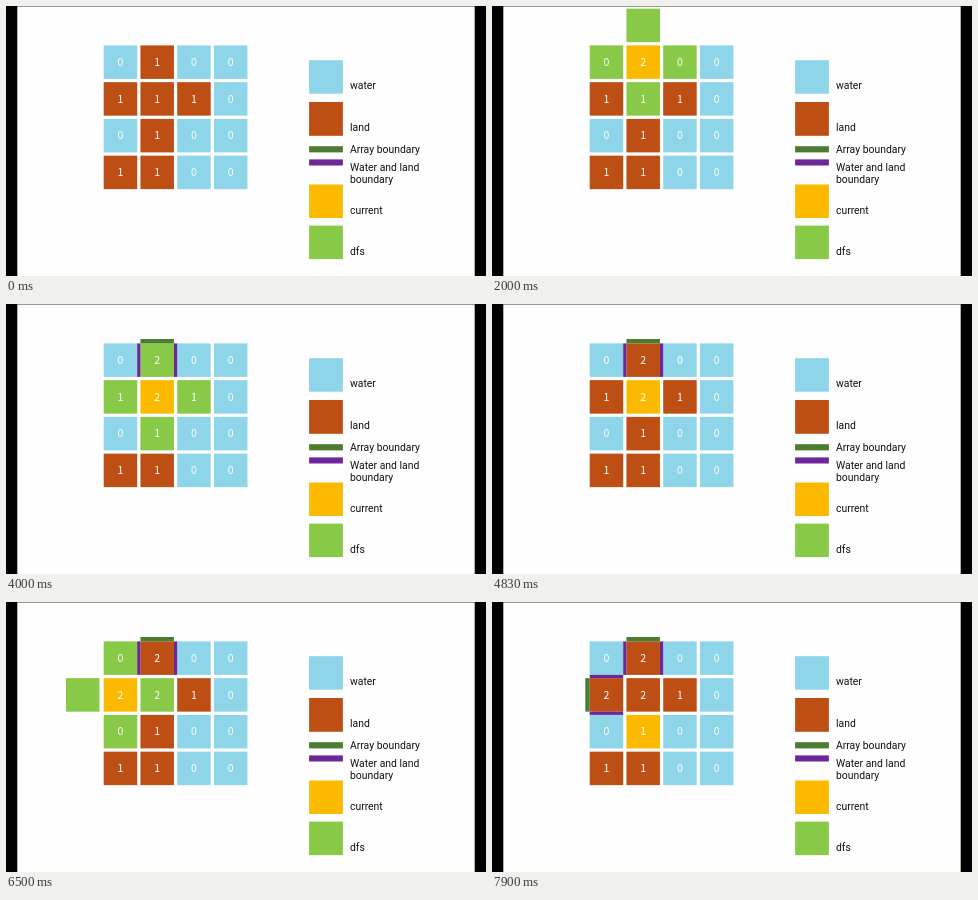
Write an HTML page that moves like this. It is 480 by 270 pixels and loops after 8 s.

```html
<!DOCTYPE html>
<html lang="en">
<head>
<meta charset="utf-8">
<title>Island perimeter</title>
<style>
  html, body { margin: 0; width: 100%; height: 100%; overflow: hidden; background: #000; }
  svg { display: block; width: 100vw; height: 100vh; }
  text { font-family: Roboto, "Open Sans", sans-serif; font-size: 10.4px; }
  .digit { fill: #fff; font-family: "Noto Sans CJK SC", "Noto Sans", sans-serif; font-size: 10.6px; text-anchor: middle; }
</style>
</head>
<body>
<svg id="stage" viewBox="0 0 480 270"></svg>
<script>
const LOOP = 8000, PITCH = 36.75, SIZE = 33.5, LEFT = 97.7, TOP = 39.4;
const COLOR = {
  water: '#8fd5e9', land: '#bd4f14', edge: '#4b7c2f',
  shore: '#6d2798', current: '#fbba00', dfs: '#88c948'
};
const grid = ['0100', '1110', '0100', '1100'];
const around = [[-1, 0], [1, 0], [0, -1], [0, 1]];
const stage = document.getElementById('stage');

function add(tag, attrs, content = '') {
  const node = document.createElementNS('http://www.w3.org/2000/svg', tag);
  for (const key in attrs) node.setAttribute(key, attrs[key]);
  node.textContent = content;
  return stage.appendChild(node);
}
const box = (x, y, width, height, fill) => add('rect', { x, y, width, height, fill });
const xOf = col => LEFT + col * PITCH;
const yOf = row => TOP + row * PITCH;
const keyOf = (row, col) => row + ',' + col;

box(11.3, 0.4, 457.4, 269.6, '#fefefe');

const legend = [
  ['water', 54.2, SIZE], ['land', 96, 33.8], ['edge', 140.2, 6.2],
  ['shore', 153.4, 6.1], ['current', 178.5, SIZE], ['dfs', 219.6, SIZE]
];
for (const [kind, y, height] of legend) box(303.1, y, 33.8, height, COLOR[kind]);

const labels = [
  ['water', 83.3], ['land', 125.2], ['Array boundary', 147.2],
  ['Water and land', 164.8], ['boundary', 177.4], ['current', 207.6], ['dfs', 248.7]
];
for (const [label, y] of labels) add('text', { x: 344, y, fill: '#111' }, label);

const cells = {};
function addCell(row, col, value, x = xOf(col)) {
  const rect = box(x, yOf(row), SIZE, SIZE, COLOR.dfs);
  const digit = add('text', {
    class: 'digit', x: x + SIZE / 2, y: yOf(row) + 20.5
  }, value);
  cells[keyOf(row, col)] = { rect, digit, value };
}
grid.forEach((line, row) => [...line].forEach((value, col) => addCell(row, col, value)));
addCell(-1, 1, '');
addCell(1, -1, '', 60);

// Each visit: current cell, then marked, neighbours searched, borders drawn.
const visits = [
  { row: 0, col: 1, start: 950, mark: 1350, search: 1750, settle: 2570 },
  { row: 1, col: 1, start: 3150, mark: 3480, search: 3900, settle: 4650 },
  { row: 1, col: 0, start: 5320, mark: 5720, search: 6150, settle: 6980 },
  { row: 2, col: 1, start: 7570, mark: Infinity, search: Infinity, settle: Infinity }
];

function addBorder(row, col, [dr, dc]) {
  const near = cells[keyOf(row + dr, col + dc)];
  if (near.value === '1') return [];
  const thick = near.value === '' ? 4.4 : PITCH - SIZE;
  const offset = d => d < 0 ? -thick : d > 0 ? SIZE : 0;
  return [box(xOf(col) + offset(dc), yOf(row) + offset(dr),
    dc ? thick : SIZE, dr ? thick : SIZE,
    near.value === '' ? COLOR.edge : COLOR.shore)];
}
for (const visit of visits) {
  visit.borders = visit.settle < LOOP
    ? around.flatMap(step => addBorder(visit.row, visit.col, step)) : [];
}

function draw(time) {
  const active = visits.filter(visit => time >= visit.start).pop();
  const searching = active && time >= active.search && time < active.settle;
  const found = new Set(searching
    ? around.map(([dr, dc]) => keyOf(active.row + dr, active.col + dc)) : []);
  const current = active && keyOf(active.row, active.col);
  const marked = new Set(visits.filter(v => time >= v.mark).map(v => keyOf(v.row, v.col)));

  for (const key in cells) {
    const { rect, digit, value } = cells[key];
    const kind = key === current ? 'current' : found.has(key) ? 'dfs'
      : value === '1' ? 'land' : 'water';
    rect.setAttribute('fill', COLOR[kind]);
    rect.style.display = value || found.has(key) ? '' : 'none';
    digit.textContent = marked.has(key) ? '2' : value;
  }
  for (const { settle, borders } of visits) {
    for (const border of borders) border.style.display = time >= settle ? '' : 'none';
  }
}

const began = performance.now();
function tick() {
  draw((performance.now() - began) % LOOP);
  requestAnimationFrame(tick);
}
tick();
</script>
</body>
</html>
```
